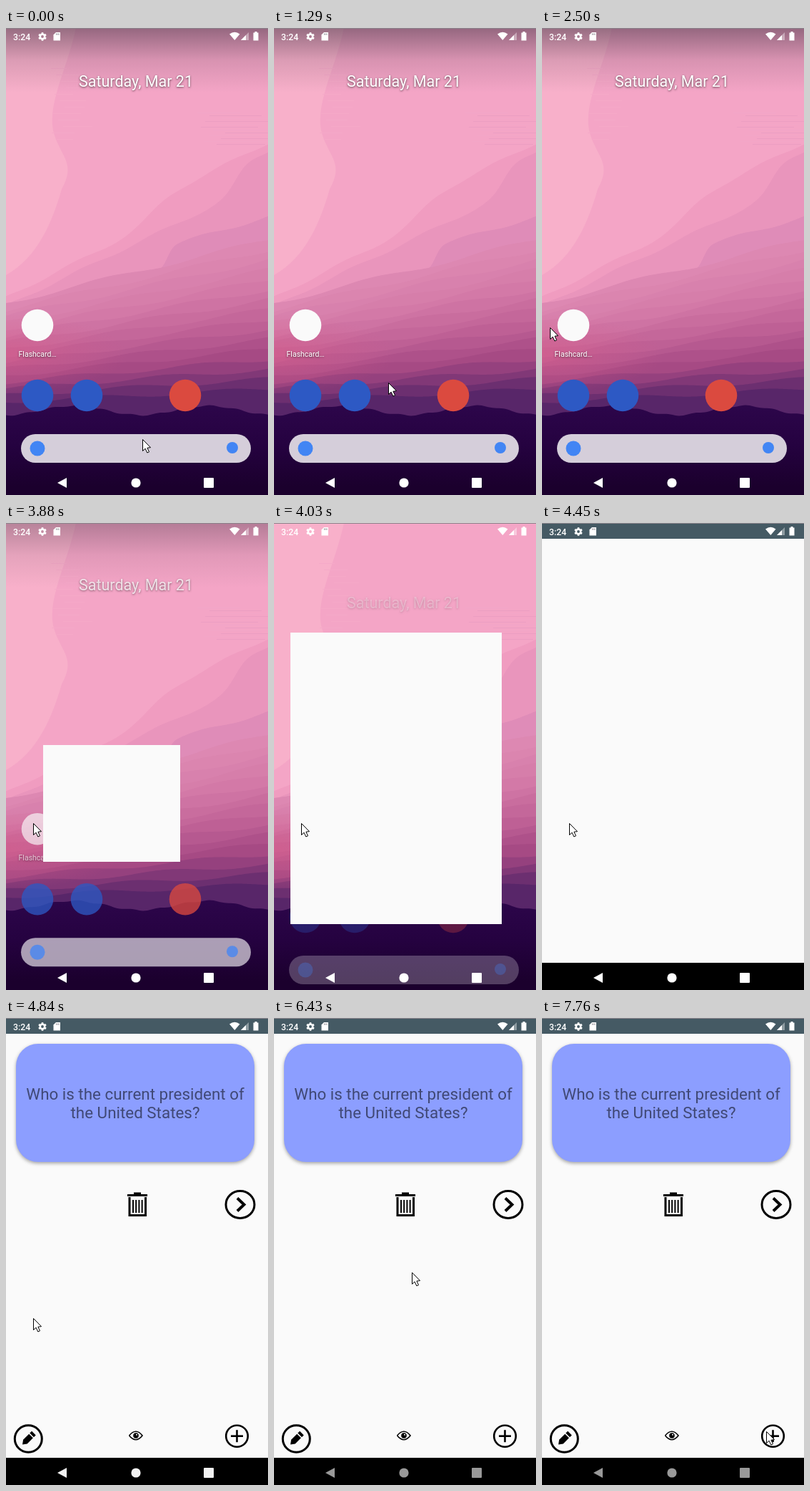
Write an HTML page with a canvas that moves like this. It is 367 by 652 pixels and loops after 8 s.

```html
<!DOCTYPE html>
<html lang="en">
<head>
<meta charset="utf-8">
<title>Flashcard launch</title>
<style>
html, body { margin: 0; width: 100%; height: 100%; overflow: hidden; background: #000; }
canvas { display: block; width: 367px; height: 652px; }
</style>
</head>
<body>
<canvas id="stage" width="367" height="652"></canvas>
<script>
const W = 367, H = 652, LOOP = 8000;
const screen = document.getElementById('stage').getContext('2d');
let c = screen;

const lerp = (a, b, u) => a + (b - a) * u;
const clamp = u => Math.min(1, Math.max(0, u));
const smooth = u => u * u * (3 - 2 * u);

function path(pts) {
  c.beginPath();
  pts.forEach(([x, y]) => c.lineTo(x, y));
}
function poly(pts, fill) {
  path(pts);
  c.closePath();
  c.fillStyle = fill;
  c.fill();
}
function line(pts, width, color) {
  path(pts);
  c.lineWidth = width;
  c.strokeStyle = color;
  c.stroke();
}
function rect(x, y, w, h, fill) {
  c.fillStyle = fill;
  c.fillRect(x, y, w, h);
}
function round(x, y, w, h, r, fill) {
  c.beginPath();
  c.roundRect(x, y, w, h, r);
  c.fillStyle = fill;
  c.fill();
}
function disc(x, y, r, fill) {
  c.beginPath();
  c.arc(x, y, r, 0, 7);
  c.fillStyle = fill;
  c.fill();
}
function ring(x, y, rx, ry, width) {
  c.beginPath();
  c.ellipse(x, y, rx, ry, 0, 0, 7);
  c.lineWidth = width;
  c.strokeStyle = '#000';
  c.stroke();
}
function text(str, x, y, font, fill, align = 'center') {
  c.font = font + ' Roboto, sans-serif';
  c.textAlign = align;
  c.fillStyle = fill;
  c.fillText(str, x, y);
}
function fade(gradient, stops) {
  stops.forEach((s, i) => gradient.addColorStop(i / (stops.length - 1), s));
  return gradient;
}
function shadowed(alpha, blur, dy, paint) {
  c.save();
  c.shadowColor = `rgba(0,0,0,${alpha})`;
  c.shadowBlur = blur;
  c.shadowOffsetY = dy;
  paint();
  c.restore();
}

// Colour at u along evenly spaced keys.
function mix(keys, u) {
  const i = Math.min(keys.length - 2, Math.floor(u * (keys.length - 1)));
  const f = u * (keys.length - 1) - i;
  return `rgb(${keys[i].map((v, k) => Math.round(lerp(v, keys[i + 1][k], f)))})`;
}

// Fills everything below the edge y = edge(x).
function land(fill, edge) {
  const pts = [[0, H]];
  for (let x = 0; x <= W + 3; x += 3) pts.push([x, edge(x)]);
  pts.push([W + 3, H]);
  poly(pts, fill);
}

// A cloud bank: a slope with one softened step up at x0.
function bank(fill, y0, slope, step, x0, soft) {
  land(fill, x => y0 - slope * x - step / (1 + Math.exp((x0 - x) / soft)) + 2 * Math.sin(x / 17 + y0));
}

function paintWallpaper() {
  rect(0, 0, W, H, '#f4a5c6');
  c.beginPath();
  c.moveTo(0, 0);
  c.lineTo(98, 0);
  c.bezierCurveTo(85, 60, 55, 110, 68, 150);
  c.bezierCurveTo(78, 180, 98, 190, 78, 225);
  c.bezierCurveTo(65, 270, 45, 320, 0, 345);
  c.fillStyle = '#f8b0ca';
  c.fill();
  for (let i = 0; i < 12; i++) {
    rect(63 + i * 7 % 23, 56 + i * 9, 22 + i * 11 % 20, 1, '#f5a9c8');
    rect(268 + i * 17 % 40, 118 + i * 4, 60 + i * 13 % 45, 1, i % 2 ? '#eb9ec2' : '#f2a6c8');
  }
  bank('#f09cc0', 376, .5, 32, 205, 15);
  bank('#e995bc', 388, .48, 40, 322, 8);
  bank('#df8cb8', 397, .28, 30, 226, 4);

  const dusk = [[221, 136, 178], [212, 123, 168], [194, 100, 152], [164, 72, 131], [88, 38, 105]];
  for (let i = 0; i <= 15; i++) {
    const u = i / 15;
    land(mix(dusk, u), x => lerp(384, 522, u) - lerp(88, 18, u) * x / W + 3 * Math.sin(x / 29 + i * 1.7));
  }

  c.save();
  c.translate(0, 455);
  c.scale(1, .33);
  c.fillStyle = fade(c.createRadialGradient(0, 0, 0, 0, 0, 170),
    ['rgba(214,90,136,.6)', 'rgba(214,90,136,.25)', 'rgba(214,90,136,0)']);
  c.fillRect(0, -170, 170, 340);
  c.restore();

  land(fade(c.createLinearGradient(0, 525, 0, 640), ['#2d064b', '#250240', '#1b002d']),
    x => 534 + 6.5 * Math.cos(x / 30) + Math.sin(x * .17));
}

const wallpaper = document.createElement('canvas');
wallpaper.width = W;
wallpaper.height = H;
c = wallpaper.getContext('2d');
paintWallpaper();
c = screen;

function statusBar() {
  text('3:24', 10, 16.5, '500 12.3px', '#fff', 'left');
  c.beginPath();
  c.arc(51, 12, 3.2, 0, 7);
  c.lineWidth = 2.6;
  c.strokeStyle = '#fff';
  c.stroke();
  for (let i = 0; i < 6; i++) {
    const a = (i + .5) * Math.PI / 3, x = Math.cos(a), y = Math.sin(a);
    line([[51 + x * 4, 12 + y * 4], [51 + x * 5.8, 12 + y * 5.8]], 2.6, '#fff');
  }
  poly([[70, 6], [76, 6], [76, 17.5], [66.5, 17.5], [66.5, 9.5]], '#fff');
  for (let i = 0; i < 3; i++) rect(70 + i * 1.8, 7.5, .9, 2.2, '#8a8790');
  c.beginPath();
  c.moveTo(320.3, 17);
  c.lineTo(313, 8.5);
  c.quadraticCurveTo(320.3, 3, 327.5, 8.5);
  c.fillStyle = '#fff';
  c.fill();
  poly([[329, 17], [340, 6], [340, 17]], 'rgba(255,255,255,.4)');
  poly([[329, 17], [336, 10], [336, 17]], '#fff');
  rect(346.5, 6.5, 7, 11, '#fff');
  rect(348.5, 5, 3, 2, '#fff');
}

function navButtons(level) {
  const color = `rgba(255,255,255,${level})`;
  poly([[72, 635], [85, 628], [85, 642]], color);
  disc(182, 635, 6.6, color);
  round(277, 628, 14, 14, 1, color);
}

// Home screen; p runs to 1 as its contents sink and fade.
function home(p) {
  c.drawImage(wallpaper, 0, 0);
  c.save();
  c.globalAlpha = 1 - p;
  rect(0, 0, W, 90, fade(c.createLinearGradient(0, 0, 0, 90),
    ['rgba(45,35,50,.48)', 'rgba(45,35,50,.14)', 'rgba(45,35,50,0)']));
  c.translate(0, 37 * p);
  shadowed(.6, 3, 1, () => text('Flashcard…', 44, 459, '10.5px', '#fff'));
  disc(44, 415, 22.3, '#fafafa');
  c.globalAlpha = 1 - .7 * p;
  shadowed(.6, 3, 1, () => text('Saturday, Mar 21', 182, 82, '21.5px', '#fff'));
  disc(44, 513, 22.3, '#2d59c4');
  disc(113, 513, 22.3, '#2d59c4');
  disc(251, 513, 22.3, '#db4a3f');
  round(21, 567, 322, 40, 20, '#d5ceda');
  disc(44, 587, 10.5, '#4285f4');
  disc(317, 586, 8, '#4285f4');
  c.restore();
}

// Blank window growing from the icon to the whole stage; its sides ease at different rates.
function openingWindow(u) {
  const w = lerp(45, W, u ** .48), h = lerp(45, H, u);
  const x = lerp(44.5, W / 2, u ** .18), y = lerp(414.5, H / 2, u ** .82);
  rect(Math.round(x - w / 2), Math.round(y - h / 2), Math.round(w), Math.round(h), '#fafafa');
}

function card() {
  const ink = 'rgba(0,0,0,.54)';
  shadowed(.35, 5, 2, () => round(14, 36, 334, 165, 31, '#8c9eff'));
  text('Who is the current president of', 181, 114, '22.4px', ink);
  text('the United States?', 181, 140, '22.4px', ink);
}

function controls() {
  const k = '#000';
  rect(170, 246, 28, 3, k);
  rect(179, 243.5, 10, 3, k);
  line([[173, 250], [173, 275.5], [195.5, 275.5], [195.5, 250]], 3, k);
  for (let i = 0; i < 4; i++) rect(177 + i * 4.2, 254, 2, 18, k);

  ring(328, 260.5, 20, 19, 3);
  line([[324, 251.5], [333.5, 260.5], [324, 269.5]], 4, k);

  ring(31.3, 587.5, 19, 18.8, 3);
  c.save();
  c.translate(31.5, 587);
  c.rotate(-Math.PI / 4);
  poly([[-12, 0], [-6.5, -4], [5, -4], [5, 4], [-6.5, 4]], k);
  rect(6.5, -4, 4, 8, k);
  c.restore();

  ring(323.5, 583.7, 15.3, 15, 2.6);
  rect(315, 582.4, 17, 2.6, k);
  rect(322.2, 575.2, 2.6, 17, k);

  c.beginPath();
  c.moveTo(172.5, 583);
  c.quadraticCurveTo(182, 571.5, 191, 583);
  c.quadraticCurveTo(182, 594.5, 172.5, 583);
  c.lineWidth = 1.6;
  c.stroke();
  disc(182, 583, 3.8, k);
  disc(183, 581.8, 1, '#fafafa');
}

function app(t) {
  rect(0, 0, W, H, '#fafafa');
  rect(0, 0, W, 22, '#455a64');
  rect(0, 614, W, 38, '#000');
  if (t >= 4720) {
    card();
    controls();
  }
  navButtons(1 - .4 * clamp(Math.floor((t - 4720) / 120) / 8));
}

// Pointer strokes: start, end, goal and an optional bend.
const strokes = [
  [840, 1440, [100, 467], [275, 540]],
  [1720, 2500, [11, 418], [45, 364]],
  [2650, 2650, [65, 446]],
  [2800, 3070, [38, 419]],
  [4960, 5680, [218, 328]],
  [5830, 6130, [178, 314]],
  [6430, 6820, [269, 491], [203, 394]],
  [7250, 7760, [314, 577]]
];

function pointerAt(t) {
  let pos = [191, 574];
  for (const [t0, t1, goal, bend] of strokes) {
    if (t < t0) break;
    const n = Math.round((t1 - t0) / 135) + 1;
    const step = t >= t1 ? n : 1 + Math.floor((t - t0) / (t1 - t0) * (n - 1) + 1e-6);
    const u = step / n;
    pos = pos.map((a, i) => {
      const b = bend ? bend[i] : (a + goal[i]) / 2;
      return lerp(lerp(a, b, u), lerp(b, goal[i], u), u);
    });
  }
  return pos.map(Math.round);
}

function pointer([x, y]) {
  c.save();
  c.translate(x + .5, y + .5);
  poly([[0, 0], [0, 16], [3.6, 12.7], [6.3, 18.5], [9, 17.3], [6.4, 11.7], [11, 11.2]], '#fff');
  c.lineWidth = 1;
  c.strokeStyle = '#000';
  c.stroke();
  c.restore();
}

function draw(t) {
  const step = Math.floor((t - 3880) / 150);
  if (step < 3) {
    const u = step < 0 ? 0 : smooth((step + 1) / 3.54);
    home(clamp(u * 1.7));
    if (u) openingWindow(u);
    navButtons(1);
  } else {
    app(t);
  }
  statusBar();
  rect(0, 0, W, 1, '#8b858c');
  pointer(pointerAt(t));
}

function tick(now) {
  draw(now % LOOP);
  requestAnimationFrame(tick);
}
requestAnimationFrame(tick);
</script>
</body>
</html>
```
